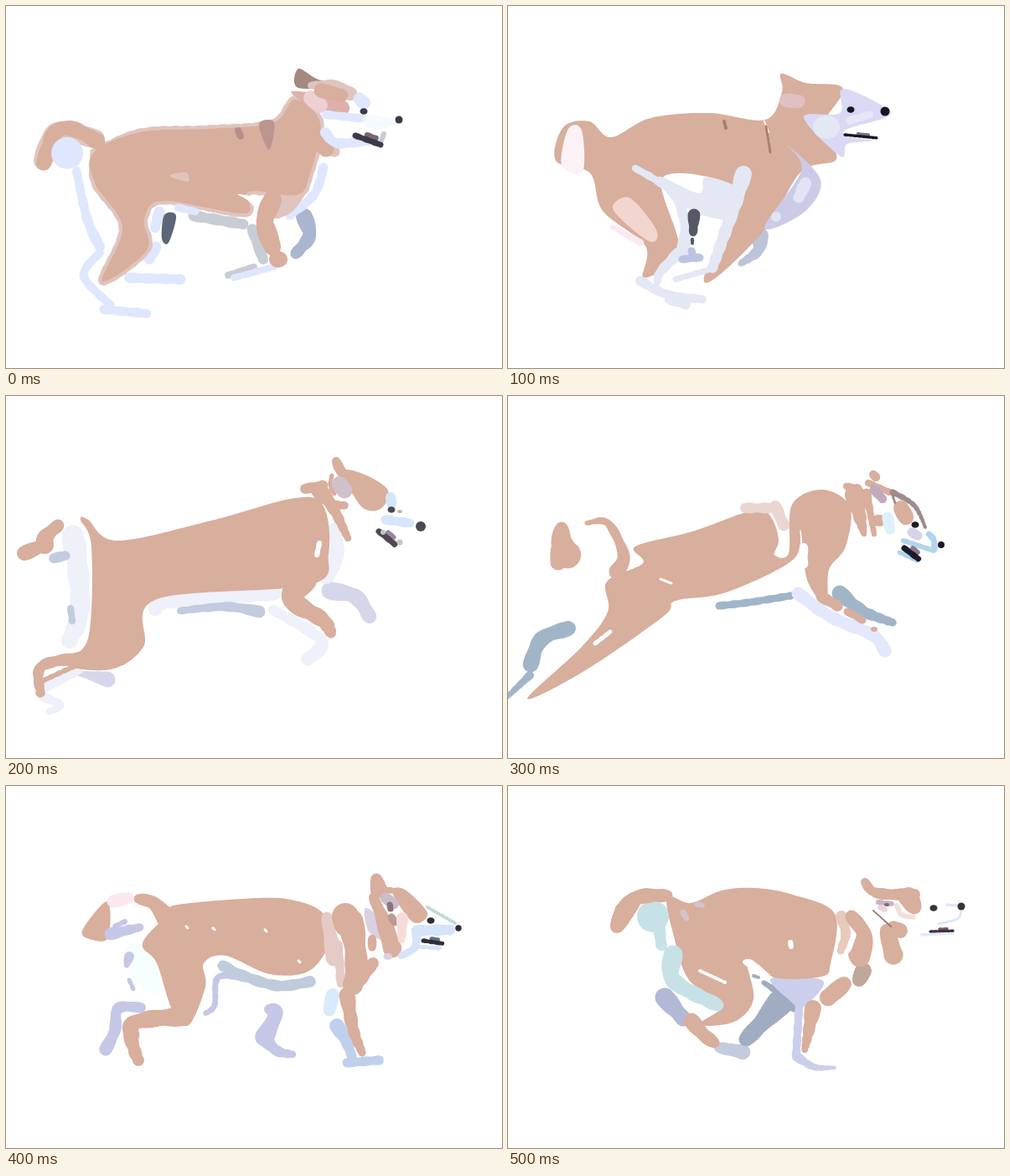
An HTML page with a canvas that plays this animation: 592 px wide and 433 px high, repeating every 600 ms.

```html
<!DOCTYPE html>
<html lang="en">
<head>
<meta charset="utf-8">
<title>Running dog</title>
<style>
  html, body { margin: 0; width: 100%; height: 100%; overflow: hidden; background: #fff; }
  canvas { display: block; }
</style>
</head>
<body>
<canvas id="stage" width="592" height="433"></canvas>
<script>
const ctx = document.getElementById('stage').getContext('2d');
const TAN = '#d8ae9d', INK = '#302d3b', WHITE = '#fff';
const HOLD = 100, STEPS = 24;

// Points on a smooth curve through x,y pairs (Catmull-Rom).
function curve(xy, closed) {
  const n = xy.length / 2, points = [];
  const key = (i, axis) => xy[2 * (closed ? (i + n) % n : Math.max(0, Math.min(n - 1, i))) + axis];
  const mix = (i, u, axis) => {
    const [a, b, c, d] = [-1, 0, 1, 2].map(k => key(i + k, axis));
    return b + u / 2 * (c - a + u * (2 * a - 5 * b + 4 * c - d + u * (3 * b - a - 3 * c + d)));
  };
  for (let k = 0; k <= (closed ? n : n - 1) * STEPS; k++) {
    const i = Math.floor(k / STEPS), u = k / STEPS - i;
    points.push([mix(i, u, 0), mix(i, u, 1)]);
  }
  return points;
}

function blob(color, ...xy) {
  ctx.beginPath();
  for (const p of curve(xy, true)) ctx.lineTo(...p);
  ctx.fillStyle = color;
  ctx.fill();
}

function dot(color, x, y, rx, ry = rx) {
  ctx.beginPath();
  ctx.ellipse(x, y, rx, ry, 0, 0, 7);
  ctx.fillStyle = color;
  ctx.fill();
}

// Lumpy stroke whose width runs from w0 to w1.
function taper(color, w0, w1, ...xy) {
  const points = curve(xy, false);
  let length = 0, last = points[0];
  ctx.beginPath();
  points.forEach(([x, y], i) => {
    length += Math.hypot(x - last[0], y - last[1]);
    last = [x, y];
    const base = (w0 + (w1 - w0) * i / (points.length - 1)) / 2;
    const r = base * (1 + .07 * Math.sin(2 * length / base));
    ctx.moveTo(x + r, y);
    ctx.arc(x, y, r, 0, 7);
  });
  ctx.fillStyle = color;
  ctx.fill();
}
const brush = (color, w, ...xy) => taper(color, w, w, ...xy);

function face(ink, [ex, ey], [nx, ny, r], [mx, my, length, tilt, w], tongue) {
  dot(ink, ex, ey, 4.5, 3.8);
  dot(ink, nx, ny, r);
  ctx.save();
  ctx.translate(mx, my);
  ctx.rotate(tilt);
  brush(tongue, w * .9, length * .4, -w * .8, length * .75, -w * .8);
  brush(ink, w, 0, 0, length, 0);
  ctx.restore();
}

function gather() {
  const ice = '#dfe7ff', halo = '#e0c4be', grey = '#c8ccd4';
  const body = [105, 175, 160, 151, 240, 147, 318, 140, 345, 112, 375, 140, 363, 200, 347, 226,
    290, 222, 285, 248, 188, 233, 165, 255, 168, 292, 115, 329, 139, 265, 106, 212];
  taper(ice, 10, 13, 84, 197, 97, 255, 112, 288);
  brush(ice, 10, 112, 295, 93, 323, 125, 358);
  brush(ice, 11, 117, 363, 168, 368);
  brush(ice, 12, 147, 325, 208, 327);
  brush(ice, 13, 183, 246, 178, 265);
  brush(ice, 13, 179, 288, 171, 303);
  brush(grey, 13, 224, 251, 283, 261);
  brush(grey, 13, 294, 267, 307, 303);
  brush(grey, 8, 265, 322, 296, 312);
  brush(ice, 8, 272, 325, 320, 312);
  taper('#aab6cf', 20, 13, 356, 252, 362, 275, 346, 296);
  brush(ice, 11, 379, 193, 368, 225, 339, 250);
  brush(halo, 9, ...body, body[0], body[1]);
  taper(halo, 26, 18, 350, 205, 342, 230, 324, 246);
  brush(halo, 14, 365, 125, 373, 165, 392, 174);
  blob(TAN, ...body);
  brush(TAN, 18, 355, 150, 382, 171);
  blob(WHITE, 277, 225, 303, 231, 300, 242, 288, 232);
  brush(TAN, 22, 318, 232, 309, 258, 318, 288);
  dot(TAN, 325, 303, 11, 10);
  blob(halo, 195, 203, 215, 199, 217, 210);
  brush(halo, 22, 44, 185, 60, 151, 107, 159);
  brush(TAN, 18, 45, 188, 58, 152, 80, 147, 109, 162);
  dot(ice, 73, 176, 19);
  brush(ice, 9, 205, 241, 226, 246);
  blob('#5b6676', 189, 250, 203, 251, 194, 283, 186, 278);
  blob('#bd958f', 302, 141, 320, 139, 314, 172);
  brush('#b78f88', 8, 277, 149, 280, 156);
  blob('#a58880', 349, 75, 373, 88, 405, 94, 349, 98);
  taper(halo, 8, 18, 364, 95, 390, 95, 411, 105);
  blob('#deb0ac', 341, 102, 402, 112, 406, 129, 370, 123);
  brush('#ecd0d2', 18, 364, 110, 375, 119);
  brush(TAN, 17, 376, 101, 400, 107);
  brush(ice, 10, 382, 130, 429, 135);
  brush(ice, 15, 422, 111, 427, 116);
  brush(ice, 12, 381, 151, 396, 164, 438, 160);
  blob('#f4fbff', 431, 130, 465, 138, 446, 148, 428, 142);
  brush(grey, 6, 451, 153, 448, 161);
  face('#3d3947', [427, 126], [469, 136, 4.5], [417, 155, 32, .35, 7], '#786676');
}

function tuck() {
  const pale = '#e4e8f4', lilac = '#d9d9f6';
  taper('#bcc4d8', 20, 7, 301, 275, 298, 293, 278, 308);
  blob(TAN, 57, 185, 66, 145, 97, 138, 123, 157, 170, 134, 240, 128, 307, 136, 327, 103, 326, 81,
    355, 92, 400, 99, 375, 145, 392, 183, 350, 198, 310, 263, 252, 322, 234, 324, 265, 255,
    270, 215, 185, 205, 204, 292, 162, 325, 164, 287, 113, 245, 98, 200);
  taper(pale, 8, 15, 152, 194, 195, 222, 211, 258, 209, 291);
  blob(pale, 180, 204, 228, 224, 235, 205, 266, 213, 278, 225, 264, 255, 212, 241);
  taper(pale, 20, 12, 281, 201, 268, 245, 244, 313);
  taper(pale, 14, 8, 203, 296, 182, 318, 178, 330);
  brush(pale, 7, 200, 327, 238, 316);
  taper(pale, 12, 10, 158, 329, 190, 345, 232, 351);
  brush(pale, 12, 193, 351, 212, 357);
  blob('#cbcbe8', 332, 166, 373, 208, 353, 247, 306, 265, 350, 197);
  brush('#e1e4f4', 14, 355, 212, 347, 229);
  dot('#e1e4f4', 320, 252, 6);
  blob(lilac, 400, 99, 453, 123, 449, 134, 405, 147, 404, 156, 436, 161, 405, 165, 397, 180, 353, 133, 396, 128);
  dot(pale, 380, 145, 16, 14);
  brush(pale, 9, 408, 137, 432, 130);
  brush('#e0c0c2', 16, 332, 113, 347, 114);
  brush('#a97d6f', 4, 258, 138, 260, 146);
  brush(WHITE, 2, 306, 138, 311, 151);
  brush('#a97d6f', 3, 308, 144, 313, 175);
  blob('#f3d5d0', 125, 239, 146, 230, 177, 268, 170, 282, 137, 257);
  taper('#faeaf3', 5, 9, 124, 264, 158, 283);
  blob('#fcf2f6', 64, 190, 72, 147, 88, 149, 89, 198);
  taper('#555866', 15, 9, 222, 250, 221, 271);
  brush('#555866', 4, 220, 279, 220, 284);
  brush('#bcc4e4', 9, 208, 303, 229, 301);
  brush('#bcc4e4', 9, 219, 293, 221, 300);
  face('#171722', [409, 124], [450, 126, 5.5], [402, 154, 38, .1, 3.5], '#777080');
}

function reach() {
  const pale = '#eef0fa', blue = '#c3cbdf', lilac = '#d4d7ea', sky = '#d5e5fb', ink = '#4c4954';
  taper(pale, 27, 20, 80, 168, 86, 210, 88, 260, 76, 292);
  brush(blue, 12, 57, 194, 71, 191);
  brush(blue, 8, 77, 254, 79, 269);
  taper(lilac, 5, 18, 85, 331, 121, 339);
  brush(pale, 14, 86, 326, 48, 347);
  taper(pale, 12, 7, 45, 360, 65, 370, 51, 378);
  brush(pale, 17, 178, 255, 195, 246, 320, 236);
  taper(blue, 8, 14, 208, 257, 262, 252, 302, 258);
  taper(pale, 12, 17, 319, 256, 376, 292, 360, 315);
  taper(lilac, 21, 16, 387, 233, 417, 240, 434, 264);
  taper(pale, 13, 23, 391, 158, 395, 185, 382, 214);
  blob(TAN, 89, 148, 98, 148, 133, 173, 245, 149, 345, 122, 379, 132, 385, 188, 362, 226,
    180, 243, 164, 300, 125, 327, 68, 320, 98, 290, 102, 181);
  brush(WHITE, 6, 374, 176, 371, 190);
  taper(TAN, 30, 12, 356, 220, 341, 243, 378, 268, 388, 284);
  taper(TAN, 15, 11, 97, 312, 43, 323, 41, 355);
  brush(TAN, 6, 82, 323, 45, 340);
  taper(TAN, 18, 16, 22, 188, 46, 178);
  taper(TAN, 22, 14, 46, 178, 48, 168, 62, 155);
  brush(TAN, 12, 357, 111, 378, 107);
  taper(TAN, 20, 8, 374, 113, 390, 133, 408, 170);
  brush(TAN, 10, 390, 130, 404, 131);
  taper(TAN, 10, 16, 394, 78, 400, 90, 412, 103);
  blob(TAN, 403, 91, 428, 94, 456, 113, 447, 135, 424, 132);
  brush(TAN, 5, 389, 95, 387, 107, 392, 117);
  brush('#cfc0cb', 18, 398, 105, 404, 113);
  brush(sky, 12, 459, 121, 460, 128);
  brush(sky, 11, 453, 148, 482, 152);
  dot(TAN, 470, 138, 3, 2);
  face(ink, [460, 136], [495, 156, 6], [445, 162, 24, .68, 7], '#9a84a0');
  dot('#c5c5c8', 450, 163, 3);
  dot('#c5c5c8', 470, 175, 3.5);
}

function fly() {
  const slate = '#a1b5c8', sky = '#b0d4ee', ice = '#e4e8fc';
  brush(slate, 18, 72, 278, 40, 291, 27, 321);
  taper(slate, 10, 5, 26, 334, -2, 361);
  brush(slate, 9, 252, 251, 287, 247, 337, 239);
  taper(slate, 19, 9, 396, 236, 423, 257, 459, 271);
  blob(TAN, 152, 180, 220, 162, 295, 136, 314, 145, 323, 172, 318, 190, 335, 188, 339, 130,
    375, 112, 408, 132, 403, 180, 383, 208, 380, 249, 357, 220, 349, 160, 340, 196,
    260, 235, 200, 245, 185, 264, 91, 329, 23, 362, 88, 300, 119, 258, 118, 222, 161, 200);
  brush(WHITE, 5, 104, 296, 122, 282);
  brush(WHITE, 3, 182, 219, 195, 224);
  brush(WHITE, 10, 353, 181, 353, 201);
  brush(ice, 15, 346, 236, 385, 264, 435, 286, 450, 305);
  brush(TAN, 13, 374, 240, 393, 251);
  brush(TAN, 9, 405, 258, 423, 268);
  dot(TAN, 437, 279, 4, 3);
  taper(TAN, 15, 34, 64, 158, 64, 175, 71, 190);
  brush(TAN, 20, 62, 180, 60, 199);
  taper(TAN, 5, 18, 94, 152, 119, 152, 138, 190, 130, 210);
  brush('#ead5d1', 12, 283, 134, 321, 134);
  brush('#ead5d1', 14, 319, 132, 329, 154);
  brush(TAN, 10, 436, 94, 439, 97);
  brush(TAN, 8, 404, 108, 418, 110);
  taper(TAN, 24, 6, 414, 118, 420, 145, 425, 165);
  taper(TAN, 11, 6, 428, 116, 437, 165);
  brush(TAN, 8, 430, 104, 455, 115);
  brush(TAN, 13, 440, 149, 444, 149);
  brush('#bfaac0', 11, 437, 112, 447, 123);
  brush(TAN, 18, 469, 134, 475, 145);
  taper('#a08a8c', 7, 4, 459, 115, 485, 131, 498, 157);
  brush('#a08a8c', 3, 458, 116, 462, 128);
  brush('#dff0fb', 13, 453, 145, 456, 160);
  brush('#d4d3e8', 11, 482, 163, 489, 167);
  brush(sky, 6, 472, 173, 508, 185);
  brush(sky, 7, 509, 183, 508, 172, 502, 165);
  brush(sky, 5, 467, 187, 488, 197);
  face('#1c1b27', [486, 154], [517, 178, 4], [473, 182, 21, .65, 7], '#8c7690');
}

function land() {
  const lilac = '#c4c8e6', sky = '#bed0ec', ice = '#d5e4f8';
  blob('#f5fffd', 146, 190, 172, 195, 184, 246, 154, 232);
  taper(lilac, 12, 7, 147, 204, 144, 214);
  brush(lilac, 5, 147, 232, 152, 243);
  taper(lilac, 12, 15, 161, 265, 134, 266, 130, 292, 119, 315);
  taper(lilac, 8, 6, 285, 230, 253, 229, 249, 262, 238, 272);
  taper(lilac, 12, 22, 314, 267, 322, 272, 309, 300);
  taper(lilac, 17, 8, 308, 302, 324, 317, 342, 321);
  brush('#c0cbdb', 13, 259, 215, 283, 227, 325, 239, 363, 234);
  blob(TAN, 195, 152, 205, 142, 300, 134, 345, 137, 378, 152, 387, 184, 362, 221,
    315, 225, 262, 203, 236, 212, 238, 240, 218, 286, 198, 267, 180, 212, 163, 188);
  taper(TAN, 11, 23, 158, 135, 176, 140, 192, 158);
  taper(TAN, 22, 13, 211, 276, 170, 279, 148, 288, 153, 315, 158, 328);
  brush(TAN, 15, 148, 287, 152, 298);
  for (const [x, y] of [[215, 168], [247, 170], [309, 172], [349, 209]]) brush(WHITE, 3, x, y, x + 2, y + 2);
  blob(TAN, 91, 173, 121, 138, 122, 181, 103, 184);
  brush('#fbe8ee', 15, 128, 138, 146, 134);
  taper(lilac, 15, 9, 125, 177, 160, 169);
  brush(lilac, 6, 130, 168, 142, 162);
  taper('#e5cac6', 13, 21, 383, 157, 392, 205);
  brush('#e5cac6', 11, 396, 190, 400, 236);
  brush('#d9eafc', 16, 390, 250, 386, 268);
  taper(sky, 18, 10, 395, 287, 406, 305, 414, 327);
  brush(sky, 11, 407, 331, 445, 328);
  brush(TAN, 32, 405, 156, 408, 164);
  taper(TAN, 29, 23, 412, 162, 418, 208, 414, 238);
  taper(TAN, 14, 10, 438, 212, 420, 240);
  taper(TAN, 19, 9, 407, 250, 414, 290, 425, 319);
  blob('#dad0e2', 428, 147, 442, 155, 452, 184, 433, 174);
  brush(TAN, 10, 437, 183, 437, 193);
  taper(TAN, 10, 24, 438, 133, 450, 160, 461, 194);
  taper(TAN, 13, 20, 442, 111, 445, 124);
  brush(TAN, 7, 445, 124, 460, 125);
  blob(TAN, 461, 127, 476, 124, 503, 152, 486, 163);
  brush('#cbbdca', 13, 453, 134, 463, 141);
  brush('#8a7380', 7, 458, 142, 459, 147);
  brush('#bc9994', 9, 460, 157, 464, 163);
  taper('#f6dcd9', 14, 9, 473, 158, 472, 184);
  brush('#dad0e2', 7, 454, 204, 457, 204);
  brush(ice, 13, 490, 173, 530, 172);
  taper(ice, 11, 8, 490, 174, 488, 193, 472, 203);
  brush(ice, 5, 489, 192, 518, 194);
  brush('#c0dada', 4, 503, 145, 536, 164);
  face(INK, [507, 161], [540, 170, 3.7], [498, 185, 23, .15, 5], '#66717f');
}

function push() {
  const teal = '#c7e2e6', slate = '#a0acc2', lilac = '#cccfec';
  taper('#b2b9d6', 23, 18, 187, 253, 209, 278);
  taper('#c4cbde', 12, 19, 252, 313, 280, 318);
  taper(slate, 17, 29, 284, 303, 306, 280, 324, 260);
  brush(slate, 14, 330, 257, 342, 264);
  taper(slate, 5, 10, 305, 235, 325, 248);
  brush(slate, 4, 293, 227, 299, 229);
  blob(lilac, 314, 230, 376, 233, 352, 265, 338, 258);
  brush(lilac, 10, 348, 254, 344, 322);
  taper(lilac, 12, 4, 345, 324, 365, 336, 390, 337);
  blob(TAN, 190, 133, 218, 140, 255, 125, 295, 122, 340, 130, 390, 153, 385, 212, 374, 228,
    318, 229, 286, 208, 293, 255, 270, 282, 228, 285, 257, 261, 216, 232, 198, 180);
  brush(WHITE, 4, 229, 221, 259, 235);
  blob(WHITE, 280, 211, 291, 208, 316, 230, 295, 222);
  brush(WHITE, 6, 337, 187, 338, 192);
  taper(TAN, 19, 14, 219, 281, 234, 298, 246, 307);
  brush('#d5c3cb', 7, 209, 151, 213, 158);
  brush('#d5c3cb', 6, 225, 141, 232, 143);
  dot(teal, 173, 156, 19);
  brush(teal, 14, 180, 168, 183, 190);
  taper(teal, 23, 16, 197, 202, 198, 233, 250, 262);
  taper(TAN, 16, 24, 130, 168, 139, 150);
  taper(TAN, 23, 14, 139, 150, 156, 133, 190, 131);
  taper(TAN, 18, 22, 401, 237, 382, 253);
  taper(TAN, 20, 7, 364, 266, 359, 292, 354, 316);
  taper('#bfa79b', 20, 16, 424, 221, 419, 232);
  taper('#e6cabb', 14, 9, 398, 156, 403, 177, 397, 197);
  taper(TAN, 15, 24, 410, 156, 425, 178, 420, 204);
  brush(TAN, 10, 411, 202, 416, 211);
  taper(TAN, 10, 15, 426, 115, 440, 128, 485, 130);
  taper(TAN, 24, 17, 478, 133, 485, 145);
  brush(TAN, 17, 460, 170, 468, 173);
  taper(TAN, 16, 25, 452, 173, 460, 202);
  brush('#c9b3c5', 6, 442, 139, 458, 141);
  brush('#ecd0de', 6, 444, 145, 450, 148);
  dot('#806b7c', 452, 142, 3, 2);
  brush('#96796d', 2, 436, 149, 457, 168);
  brush('#f4dfd8', 6, 464, 143, 470, 154, 484, 157);
  brush('#dfe3f9', 3, 524, 142, 536, 143);
  brush('#dfe3f9', 3, 541, 150, 536, 159, 514, 165);
  brush('#e5ebfa', 4, 494, 178, 531, 176);
  face('#37343b', [508, 146], [541, 144, 4.5], [504, 174, 27, -.03, 3.2], '#765060');
}

const poses = [gather, tuck, reach, fly, land, push];
const start = performance.now();
function tick() {
  const t = performance.now() - start;
  ctx.fillStyle = WHITE;
  ctx.fillRect(0, 0, 592, 433);
  poses[Math.floor(t / HOLD) % poses.length]();
  requestAnimationFrame(tick);
}
tick();
</script>
</body>
</html>
```
